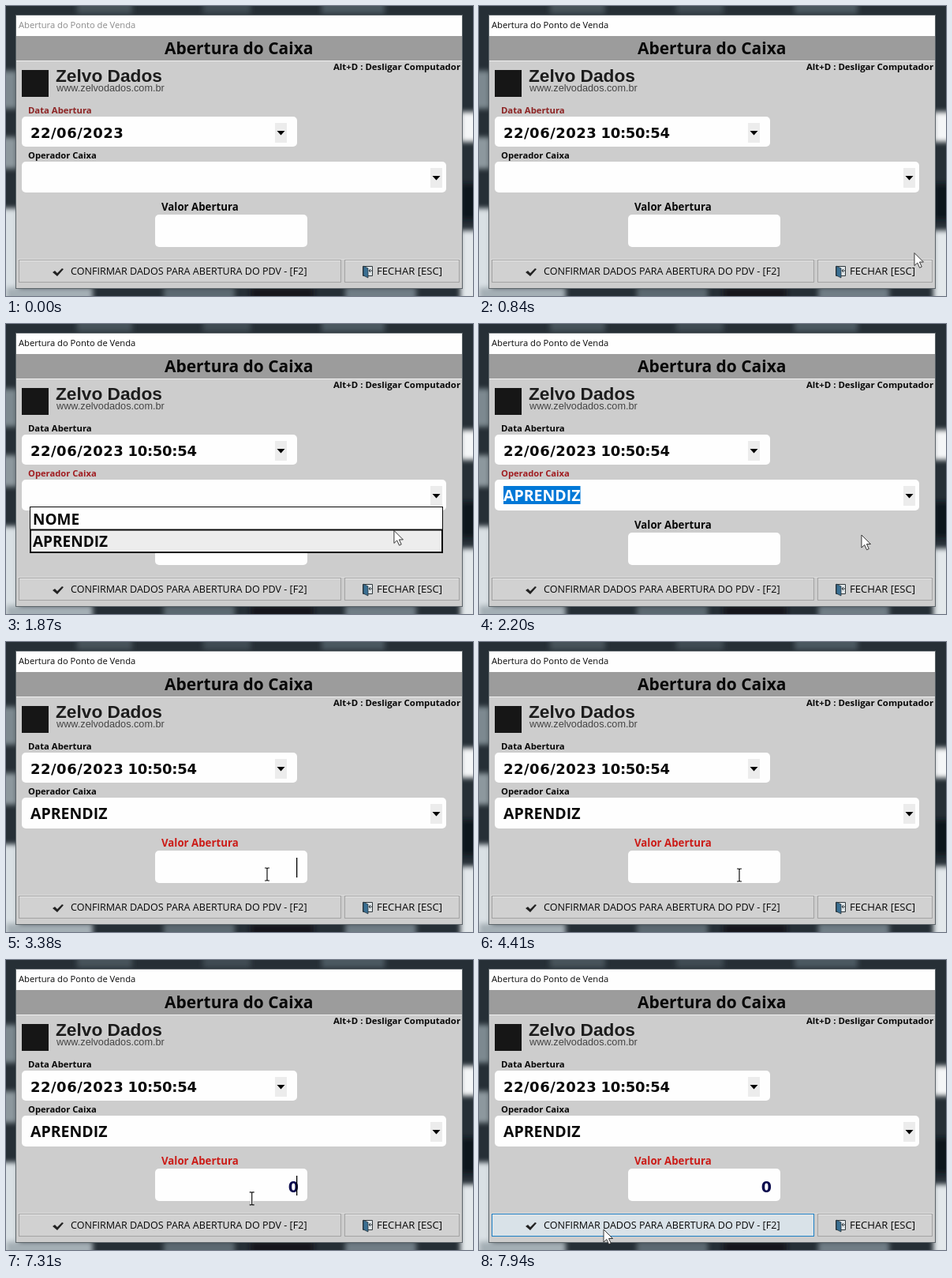
Recreate the animation shown at these times as an HTML page. Size 592 px wide and 367 px high, loop 8 s.

```html
<!DOCTYPE html>
<html lang="pt-BR">
<head>
<meta charset="utf-8">
<title>Abertura do Caixa</title>
<style>
  html, body { margin: 0; width: 100%; height: 100%; overflow: hidden; background: #283038; }
  svg { display: block; width: 592px; height: 367px; }
  text { font-family: "Open Sans", "Noto Sans", sans-serif; fill: #080808; white-space: pre; }
  .b { font-weight: 700; }
  .num { font: 700 18px "DejaVu Sans", sans-serif; }
  .brand { font-family: "Liberation Sans", Arial, sans-serif; }
  .field { fill: #fefefe; }
  .button { fill: #d1d1d1; stroke: #a3a3a3; }
</style>
</head>
<body>
<svg viewBox="0 0 592 367" xmlns="http://www.w3.org/2000/svg">
  <defs>
    <filter id="soft" x="-20%" y="-20%" width="140%" height="140%"><feGaussianBlur stdDeviation="3"/></filter>
  </defs>

  <rect width="592" height="367" fill="#262f36"/>
  <g id="backdrop" filter="url(#soft)"></g>

  <rect x="12" y="11" width="567" height="347" fill="#5d656a"/>
  <rect x="13" y="12" width="565" height="345" fill="#cdcdcd"/>
  <rect x="13" y="12" width="565" height="26" fill="#fefefe"/>
  <rect x="13" y="38" width="565" height="31" fill="#9c9c9c"/>
  <path d="M13 69.5H578" stroke="#f0f0f0"/>
  <text id="title" x="16" y="28" font-size="11.2">Abertura do Ponto de Venda</text>
  <text class="b" x="201" y="61" font-size="20.95">Abertura do Caixa</text>

  <rect x="20" y="81" width="34" height="34" fill="#161616"/>
  <text class="b brand" x="63" y="96" font-size="22.7" style="fill:#1c1c1c">Zelvo Dados</text>
  <text class="brand" x="64" y="108" font-size="12.7" style="fill:#444">www.zelvodados.com.br</text>
  <text class="b" x="415" y="81" font-size="11.4">Alt+D : Desligar Computador</text>

  <text id="dateLabel" class="b" x="28" y="136" font-size="11.3">Data Abertura</text>
  <rect class="field" x="20" y="140" width="349" height="38" rx="5"/>
  <text class="num" x="31" y="167" letter-spacing=".5">22/06/2023</text>
  <text id="clock" class="num" x="154.5" y="167" letter-spacing="-.3">10:50:54</text>
  <rect x="341" y="148" width="15" height="25" fill="#ececec"/>
  <path d="M343.5 158h10l-5 5.5z"/>

  <text id="userLabel" class="b" x="28" y="193" font-size="11.2">Operador Caixa</text>
  <rect class="field" x="20" y="197" width="538" height="39" rx="5"/>
  <rect x="538" y="205" width="15" height="25" fill="#ececec"/>
  <path d="M540.5 215h10l-5 5.5z"/>
  <rect id="selection" x="31" y="205" height="23" fill="#0078d7"/>
  <text id="user" class="b" x="31" y="224" font-size="19.5">APRENDIZ</text>

  <text id="valueLabel" class="b" x="197" y="259" font-size="13.25">Valor Abertura</text>
  <rect class="field" x="189" y="264" width="193" height="41" rx="5"/>
  <text id="value" class="num" x="371" y="294" text-anchor="end" style="font-size:19px;fill:#0b0b4d">0</text>
  <rect id="caret" x="368" y="273" width="1.3" height="25"/>

  <g id="list">
    <rect x="30.5" y="231.5" width="523" height="58" fill="#fefefe" stroke="#080808"/>
    <rect id="row" x="31" y="232" width="522" height="28.5" fill="#ededed" stroke="#080808" stroke-width="2"/>
    <text class="b" x="34" y="254" font-size="19">NOME</text>
    <text class="b" x="34" y="282" font-size="19">APRENDIZ</text>
  </g>

  <path d="M15 320.5H576" stroke="#dcdcdc"/>
  <rect id="confirm" class="button" x="16.5" y="321.5" width="408" height="28"/>
  <rect class="button" x="429.5" y="321.5" width="145" height="28"/>
  <path d="M17.5 322.5h406M430.5 322.5h143" stroke="#e6e6e6"/>
  <path d="M59 337l3-2 3 3 6-6 2 1-8 9z" fill="#222"/>
  <text x="82" y="340" font-size="12.57">CONFIRMAR DADOS PARA ABERTURA DO PDV - [F2]</text>
  <path d="M452.5 329.5h12v12h-12z" fill="#dfe5e8" stroke="#30383c"/>
  <path d="M453 329l6 3v12l-6-3z" fill="#3a6f92" stroke="#202a30" stroke-width=".7"/>
  <path d="M465 335h-5m2-2l-2 2 2 2" fill="none" stroke="#30383c"/>
  <text x="470" y="340" font-size="13.08">FECHAR [ESC]</text>

  <path id="arrow" d="M0 0V16l3.8-3.5 2.8 6.2 2.7-1.2-2.8-6H11.5z" fill="#fff" stroke="#222" stroke-width=".9"/>
  <g id="beam" fill="none">
    <path d="M0-7V7" stroke="#fff" stroke-width="3"/>
    <path d="M-3-8h2.2l.8.8.8-.8H3M0-7V7M-3 8h2.2L0 7.2.8 8H3" stroke="#111" stroke-width="1.2"/>
  </g>
</svg>
<script>
const LOOP = 8000;
const BLINK = 540;
const $ = id => document.getElementById(id);
const NS = "http://www.w3.org/2000/svg";

// Soft patches seen around the window edge: x, y, width, height, colour
[
  [90, -8, 70, 18, "#46525a"], [250, -8, 60, 18, "#3f4b53"],
  [400, -8, 80, 18, "#4b5860"],
  [-8, 82, 22, 48, "#7d8990"], [-8, 166, 22, 40, "#8d989e"],
  [-8, 256, 24, 120, "#d9e0e4"],
  [576, 134, 24, 38, "#f4f6f7"], [576, 225, 24, 45, "#10171b"],
  [576, 284, 24, 90, "#e3e8eb"],
  [0, 356, 110, 18, "#a4afb5"], [200, 356, 90, 18, "#5b6971"],
  [310, 356, 80, 18, "#12191d"], [430, 356, 90, 18, "#6f7d85"]
].forEach(([x, y, width, height, fill]) => {
  const patch = document.createElementNS(NS, "rect");
  Object.entries({ x, y, width, height, fill }).forEach(([k, v]) => patch.setAttribute(k, v));
  $("backdrop").append(patch);
});

// Pointer stops: time, x, y
const stops = [
  [140, 592, 385], [840, 552, 313], [1050, 545, 217], [1380, 545, 217],
  [1520, 527, 233], [1940, 485, 267], [2200, 485, 267], [2480, 467, 280],
  [2750, 467, 280], [3050, 331, 294], [3590, 331, 294], [3860, 330, 295],
  [5800, 330, 295], [6140, 369, 291], [6600, 369, 291], [6770, 400, 285],
  [6940, 400, 285], [7730, 212, 321], [7940, 158, 341]
];

const within = (t, a, b) => t >= a && t < b;
const show = (id, on) => $(id).setAttribute("visibility", on ? "visible" : "hidden");
const paint = (id, color) => { $(id).style.fill = color; };

function pointerAt(t) {
  const i = stops.findIndex(s => s[0] > t);
  if (i === 0) return stops[0].slice(1);
  if (i < 0) return stops[stops.length - 1].slice(1);
  const [t0, x0, y0] = stops[i - 1], [t1, x1, y1] = stops[i];
  const p = (t - t0) / (t1 - t0);
  return [x0 + (x1 - x0) * p, y0 + (y1 - y0) * p];
}

function caretOn(t) {
  return within(t, 3060, 3590) || (t >= 3860 && Math.floor((t - 3860) / BLINK) % 2 === 0);
}

function draw(t) {
  const active = t >= 140, opened = t >= 1050, picked = t >= 2200;
  const focused = t >= 3060, typed = t >= 5470, hover = t >= 7800;
  const [x, y] = pointerAt(t);

  paint("title", active ? "#080808" : "#8b8b8b");
  show("clock", active);
  paint("dateLabel", opened ? "#080808" : "#8d2424");
  paint("userLabel", opened && !focused ? "#a01c20" : "#080808");
  paint("valueLabel", focused ? "#cb1c18" : "#080808");

  show("list", opened && !picked);
  $("row").setAttribute("y", y > 261 ? 260.5 : 232);
  show("user", picked);
  show("selection", picked && !focused);
  paint("user", focused ? "#080808" : "#fff");

  show("value", typed);
  show("caret", caretOn(t));
  paint("confirm", hover ? "#d9e2e8" : "#d1d1d1");
  $("confirm").style.stroke = hover ? "#1d7fc4" : "#a3a3a3";

  const overField = within(x, 189, 382) && within(y, 264, 305);
  ["arrow", "beam"].forEach(id => $(id).setAttribute("transform", `translate(${x} ${y})`));
  show("arrow", !overField);
  show("beam", overField);
}

$("selection").setAttribute("width", $("user").getComputedTextLength());

const start = performance.now();
function tick() {
  draw((performance.now() - start) % LOOP);
  requestAnimationFrame(tick);
}
tick();
</script>
</body>
</html>
```
